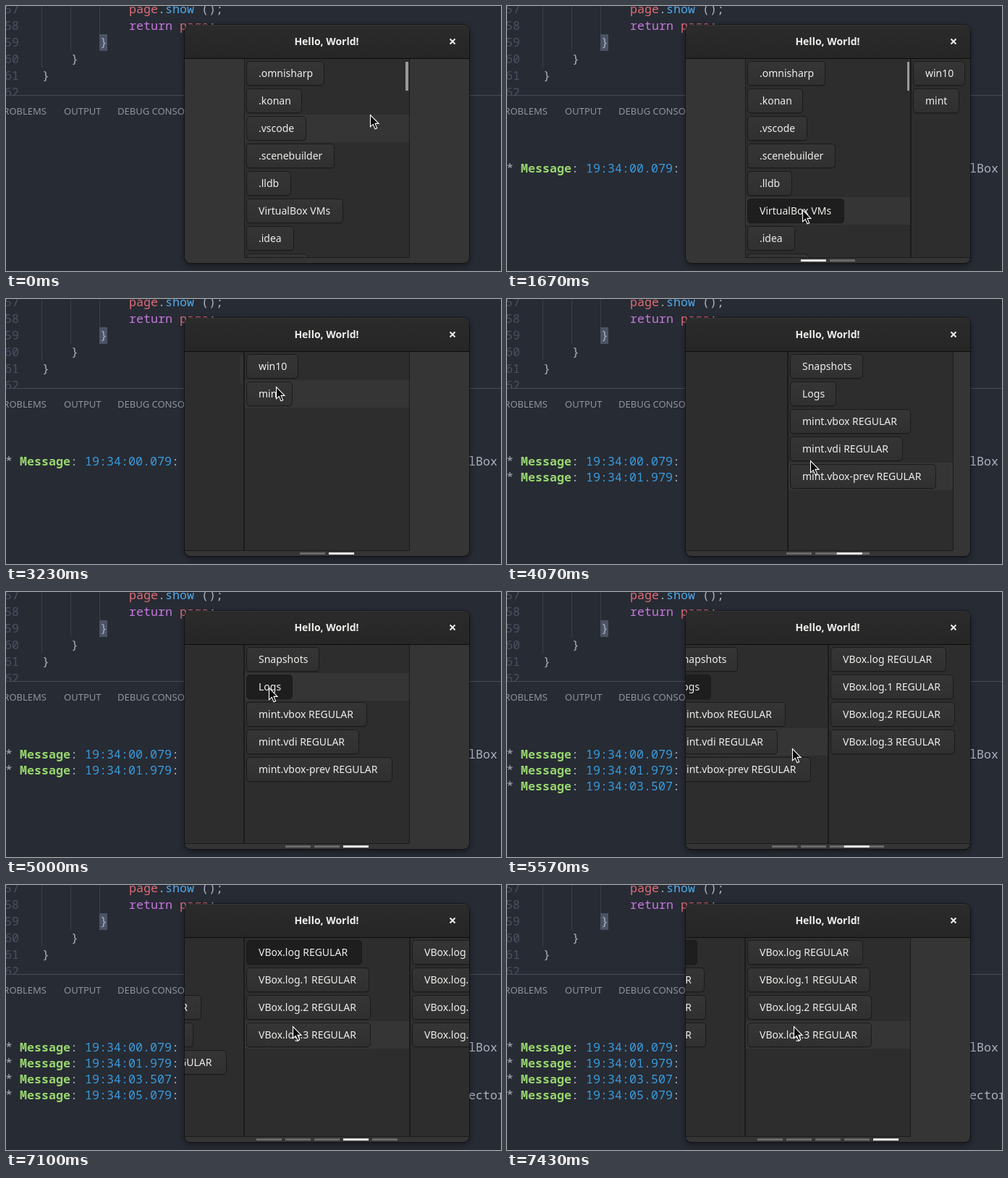
Recreate the animation shown at these times as an HTML page. Size 684 px wide and 366 px high, loop 8 s.

```html
<!DOCTYPE html>
<html lang="en">
<head>
<meta charset="utf-8">
<title>Carousel file browser</title>
<style>
  html, body { margin: 0; width: 100%; height: 100%; overflow: hidden; background: #272b34; }
  svg { display: block; width: 684px; height: 366px; }
  text { white-space: pre; }
  .code { font: 16.67px "Noto Sans Mono", "DejaVu Sans Mono", monospace; fill: #abb2bf; }
  .num { fill: #495162; }
  .tab { font: 13px "Noto Sans", sans-serif; fill: #8f949c; }
  .ui { font: 14px "Noto Sans", sans-serif; fill: #eeeeec; }
  .title { font-weight: 700; text-anchor: middle; }
  .bold { font-weight: 700; fill: #98d56e; }
  .time { fill: #3a9bdc; }
</style>
</head>
<body>
<svg viewBox="0 0 684 366" xmlns="http://www.w3.org/2000/svg">
  <defs>
    <linearGradient id="head" x1="0" y1="0" x2="0" y2="1">
      <stop offset="0" stop-color="#2b2b2b"/><stop offset="1" stop-color="#262626"/>
    </linearGradient>
    <linearGradient id="btn" x1="0" y1="0" x2="0" y2="1">
      <stop offset="0" stop-color="#353535"/><stop offset="1" stop-color="#303030"/>
    </linearGradient>
    <filter id="shadow" x="-10%" y="-10%" width="120%" height="120%">
      <feDropShadow dx="0" dy="3" stdDeviation="5" flood-color="#000" flood-opacity=".5"/>
    </filter>
    <clipPath id="editorClip"><rect width="684" height="123"/></clipPath>
    <clipPath id="viewClip"><rect x="247" y="73" width="393" height="275"/></clipPath>
    <clipPath id="listClip"><rect x="1" y="73" width="227" height="274"/></clipPath>
  </defs>

  <rect width="684" height="366" fill="#272b34"/>
  <g id="editor" clip-path="url(#editorClip)">
    <path d="M49.5 0V85M89.5 0V62M129.5 0V39" stroke="#3b4048"/>
    <rect x="129" y="39" width="11" height="23" fill="#4b5365"/>
  </g>
  <path d="M0 123.5H684" stroke="#464b56"/>
  <g class="tab">
    <text x="56" y="150" text-anchor="end">PROBLEMS</text>
    <text x="80" y="150">OUTPUT</text>
    <text x="154" y="150">DEBUG CONSOLE</text>
  </g>
  <g id="terminal"></g>

  <rect x="247" y="26" width="393" height="329" rx="8" fill="#353535" filter="url(#shadow)"/>
  <rect x="246.5" y="25.5" width="394" height="330" rx="8.5" fill="none" stroke="#000" stroke-opacity=".4"/>
  <path d="M247 72V34a8 8 0 0 1 8-8H632a8 8 0 0 1 8 8V72Z" fill="url(#head)"/>
  <path d="M254 26.5H633" stroke="#fff" stroke-opacity=".05"/>
  <path d="M247 72.5H640" stroke="#0c0c0c"/>
  <text class="ui title" x="443" y="54">Hello, World!</text>
  <path d="M613.5 45.5l7 7m0-7l-7 7" stroke="#eeeeec" stroke-width="2"/>

  <g clip-path="url(#viewClip)"><g id="strip"></g></g>
  <g id="dots"></g>
  <path id="cursor" d="M.5 .5V16.8L4.2 13.4L7 19.8L9.7 18.6L7 12.4H12Z" fill="#0a0a0a" stroke="#fff" stroke-width="1.1"/>
</svg>

<script>
const LOOP = 8000, PITCH = 229, LEFT = 329, TOP = 74, ROW = 38;
const $ = id => document.getElementById(id);

function add(parent, tag, attrs, label) {
  const el = document.createElementNS("http://www.w3.org/2000/svg", tag);
  for (const k in attrs) el.setAttribute(k, attrs[k]);
  if (label) el.textContent = label;
  parent.appendChild(el);
  return el;
}
const show = (el, on) => el.setAttribute("visibility", on ? "inherit" : "hidden");
const clamp = v => Math.min(1, Math.max(0, v));

// Editor text: x, line, text, colour
const lineY = n => 10 + (n - 57) * 23;
for (let n = 57; n <= 62; n++)
  add($("editor"), "text", { x: -2, y: lineY(n), class: "code num" }, String(n));
for (const [x, n, s, fill] of [
  [170, 57, "page", "#e06c75"], [210, 57, ".", "#abb2bf"],
  [220, 57, "show", "#4fa9e8"], [270, 57, "();", "#abb2bf"],
  [170, 58, "return", "#c678dd"], [240, 58, "page", "#e06c75"], [280, 58, ";", "#abb2bf"],
  [130, 59, "}", "#abb2bf"], [90, 60, "}", "#abb2bf"], [50, 61, "}", "#abb2bf"]
]) add($("editor"), "text", { x, y: lineY(n), class: "code", style: "fill:" + fill }, s);

// Log lines; each one comes with a newly opened page
const logs = [
  [1670, "19:34:00.079", "lBox"],
  [3570, "19:34:01.979", ""],
  [5100, "19:34:03.507", ""],
  [6670, "19:34:05.079", "ectory"]
].map(([at, stamp, tail], i) => {
  const el = add($("terminal"), "g", { class: "code" }), y = 230 + i * 22;
  const put = (x, s, cls = "") => add(el, "text", { x, y, class: cls }, s);
  put(-1, "*");
  put(19, "Message", "bold");
  put(89, ":");
  put(109, stamp, "time");
  put(229, ":");
  if (tail) put(639, tail);
  return { at, el };
});

// Pages: opening time, clicked row, click time, [label, button width]...
const logFiles = [["VBox.log REGULAR", 160], ["VBox.log.1 REGULAR", 170],
                  ["VBox.log.2 REGULAR", 172], ["VBox.log.3 REGULAR", 172]];
const pages = [
  [0, 5, 1570, [[".omnisharp", 108], [".konan", 77], [".vscode", 83], [".scenebuilder", 122],
                [".lldb", 62], ["VirtualBox VMs", 134], [".idea", 66], ["", 85]]],
  [1670, 1, 3470, [["win10", 72], ["mint", 64]]],
  [3570, 1, 5000, [["Snapshots", 101], ["Logs", 64], ["mint.vbox REGULAR", 167],
                   ["mint.vdi REGULAR", 156], ["mint.vbox-prev REGULAR", 202]]],
  [5100, 0, 6570, logFiles],
  [6670, -1, LOOP, logFiles]
].map(([at, hit, pressAt, rows], i) => {
  const el = add($("strip"), "g", { transform: `translate(${LEFT + i * PITCH})` });
  add(el, "rect", { x: .5, y: 72.5, width: 228, height: 275, fill: "#2d2d2d", stroke: "#1b1b1b" });
  const list = add(el, "g", { "clip-path": "url(#listClip)" });
  const hover = add(list, "rect", { x: 1, width: 227, height: ROW, fill: "#353535" });
  const buttons = rows.map(([label, w], r) => {
    const y = TOP + r * ROW + 2;
    add(list, "rect", { x: 3, y: y + 1, width: w, height: 34, rx: 5, fill: "#000", opacity: .15 });
    const box = add(list, "rect", { x: 3.5, y: y + .5, width: w - 1, height: 33, rx: 4.5,
                                    fill: "url(#btn)", stroke: "#1b1b1b" });
    add(list, "text", { x: 20, y: y + 22, class: "ui" }, label);
    return box;
  });
  return { at, hit, pressAt, el, hover, buttons, count: rows.length };
});
const thumb = add(pages[0].el, "rect", { y: 77, height: 40, rx: 1, fill: "#9a9a9a" });

const bars = pages.map(() => add($("dots"), "rect", { y: 350, width: 35, height: 3, fill: "#6a6a6a" }));
const active = add($("dots"), "rect", { y: 350, width: 35, height: 3, fill: "#eeeeec" });

// Pointer moves: start, end, number of hops, x, y
const moves = [
  [230, 1030, 9, 409, 226], [1130, 1470, 4, 408, 281], [2030, 2230, 3, 429, 252],
  [2430, 2430, 1, 434, 232], [2830, 3230, 5, 373, 121], [3730, 3930, 3, 419, 223],
  [4370, 4770, 5, 363, 132], [5270, 5470, 3, 394, 216], [6070, 6070, 1, 390, 208],
  [6170, 6470, 4, 383, 89], [6900, 7100, 3, 396, 195]
];
function pointer(t) {
  let x = 503, y = 150;
  for (const [t0, t1, hops, toX, toY] of moves) {
    if (t < t0) break;
    const p = t >= t1 ? 1 : (Math.floor((t - t0) / (t1 - t0) * (hops - 1)) + 1) / hops;
    x += (toX - x) * p;
    y += (toY - y) * p;
  }
  return [Math.round(x), Math.round(y)];
}

// Each wheel scroll eases out over 250 ms
const scrolls = [2530, 3980, 5520, 7180];
const position = t => scrolls.reduce((sum, s) => sum + 1 - (1 - clamp((t - s) / 250)) ** 3, 0);

function render(t) {
  const pos = position(t), [x, y] = pointer(t);
  const shift = Math.round(pos * PITCH);
  const overPage = Math.floor((x - LEFT + shift) / PITCH);
  const overRow = Math.floor((y + 3 - TOP) / ROW);
  const count = pages.filter(p => t >= p.at).length;

  $("strip").setAttribute("transform", `translate(${-shift})`);
  pages.forEach((p, i) => {
    show(p.el, i < count);
    show(p.hover, i === overPage && overRow >= 0 && overRow < p.count);
    p.hover.setAttribute("y", TOP + overRow * ROW);
    if (p.hit >= 0)
      p.buttons[p.hit].setAttribute("fill", t >= p.pressAt ? "#1e1e1e" : "url(#btn)");
  });
  logs.forEach(l => show(l.el, t >= l.at));

  const thin = clamp((t - 230) / 200);
  thumb.setAttribute("x", 223 + thin);
  thumb.setAttribute("width", 4 - thin);
  thumb.setAttribute("opacity", 1 - .93 * clamp((t - 2780) / 450));

  const start = 443.5 - (count * 40 - 5) / 2;
  show($("dots"), count > 1);
  bars.forEach((b, i) => {
    show(b, i < count);
    b.setAttribute("x", start + i * 40);
  });
  active.setAttribute("x", start + pos * 40);
  $("cursor").setAttribute("transform", `translate(${x} ${y})`);
}

function tick() {
  render(performance.now() % LOOP);
  requestAnimationFrame(tick);
}
tick();
</script>
</body>
</html>
```
